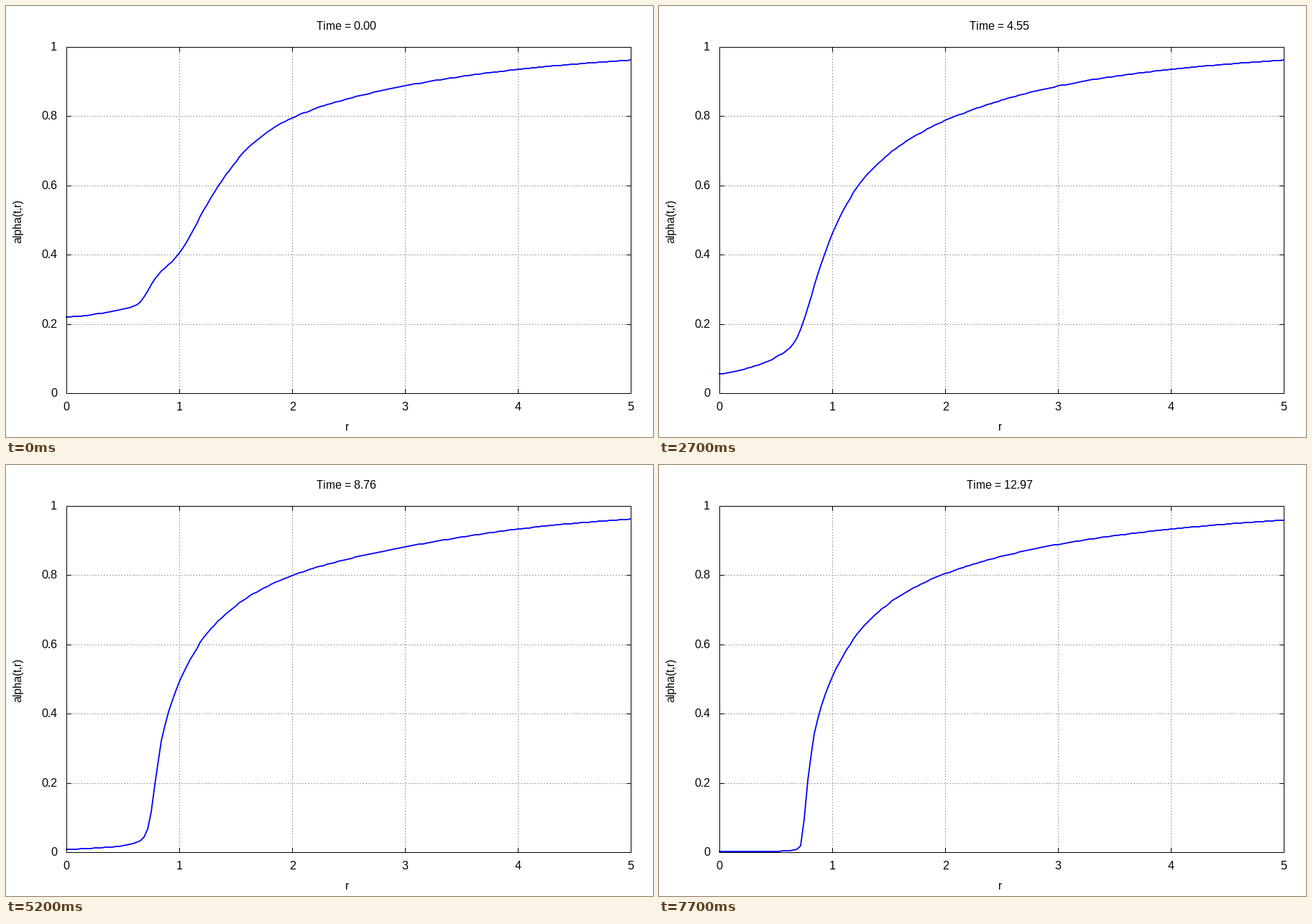
A matplotlib script that plays this animation: 900 by 600 pixels, repeating every 7800 ms.

```python
import numpy as np
import matplotlib.pyplot as plt
from matplotlib.animation import FuncAnimation

W, H, DPI = 900, 600, 100
PX = 72 / DPI                       # one pixel in points
LEFT, RIGHT, TOP, BOTTOM = 84, 869, 57, 539
FRAMES, DT = 78, 0.16847
TICK = 6

plt.rcParams["font.family"] = "Liberation Sans"
plt.rcParams["font.size"] = 16 * PX
plt.rcParams["text.hinting"] = "default"
plt.rcParams["text.hinting_factor"] = 1


def step_down(r, center, width):
    return 1 / (1 + np.exp((r - center) / width))


def lapse(r, t):
    """Collapsing lapse: frozen core, steep front, pulse moving outwards."""
    # Exterior: a line that bends up, plus a widening pulse
    line = 3.05 * r - 2.05 + 0.013 * (t - 11)
    bend = 0.28 * np.maximum(r - 1.5, 0) ** 3
    center = 1.3 + 0.07 * t + 0.016 * t * t
    width = 0.5 + 0.065 * t
    depth = (0.25 + 0.18 * np.exp(-t / 3)) * np.maximum(1, r / 2) ** 2
    pulse = depth * np.exp(-((r - center) / width) ** 2)
    outer = line + bend - pulse - 0.6 * step_down(r, 0.71, 0.045)

    # Core: decays exponentially while its edge sharpens
    core = 1 / (0.72 * np.exp(0.47 * t) + 0.43 * np.exp(-0.8 * t))
    core *= np.exp(-0.9 * r * np.exp(-t / 2))
    core *= step_down(r, 0.77 + 0.08 * np.exp(-t),
                      0.05 + 0.08 * np.exp(-t / 3))

    # Smooth hinge joining both; alpha / (1 - alpha) equals odds
    odds = outer / 2 + np.sqrt(outer ** 2 / 4 + core)
    return odds / (1 + odds)


radii = np.linspace(0, 5, 161)
curve_x = np.round(LEFT + radii / 5 * (RIGHT - LEFT))

fig = plt.figure(figsize=(W / DPI, H / DPI), dpi=DPI, facecolor="white")
ax = fig.add_axes([0, 0, 1, 1])
ax.set_xlim(0, W)
ax.set_ylim(H, 0)
ax.axis("off")


def stroke(xs, ys, color="black", z=3, **style):
    ax.plot(xs, ys, color=color, lw=PX, snap=False, zorder=z,
            solid_capstyle="butt", **style)


def hline(y, x0, x1, **style):
    stroke([x0, x1 + 1], [y + .5, y + .5], **style)


def vline(x, y0, y1, **style):
    stroke([x + .5, x + .5], [y0, y1 + 1], **style)


def label(x, y, text, **style):
    style = {"ha": "center", "va": "baseline", **style}
    return ax.text(x, y, text, color="black", **style)


GRID = dict(color="#a0a0a0", z=1, dashes=(2, 2), dash_capstyle="butt")

for i in range(6):
    x = LEFT + 157 * i
    y = BOTTOM - round(96.4 * i)
    if 0 < i < 5:
        vline(x, TOP, BOTTOM, **GRID)
        hline(y, LEFT, RIGHT, **GRID)
        vline(x, BOTTOM - TICK, BOTTOM)
        vline(x, TOP, TOP + TICK)
        hline(y, LEFT, LEFT + TICK)
        hline(y, RIGHT - TICK, RIGHT)
    label(x + .25, 563, str(i))
    label(71, y + 5, f"{i / 5:g}", ha="right")

for y in (TOP, BOTTOM):
    hline(y, LEFT, RIGHT)
for x in (LEFT, RIGHT):
    vline(x, TOP, BOTTOM)

label(474.5, 591, "r")
label(21, 299, "alpha(t,r)", rotation=90, rotation_mode="anchor")
title = label(474, 33, "")
curve, = ax.plot([], [], color="#0000ff", lw=1.8 * PX, snap=False,
                 solid_capstyle="projecting", solid_joinstyle="round",
                 zorder=2)


def update(i):
    t = i * DT
    title.set_text(f"Time = {t:.2f}")
    curve.set_data(curve_x, np.round(BOTTOM - lapse(radii, t) * (BOTTOM - TOP)))
    return title, curve


anim = FuncAnimation(fig, update, frames=FRAMES, interval=100,
                     repeat=True, repeat_delay=0)
plt.show()
```
